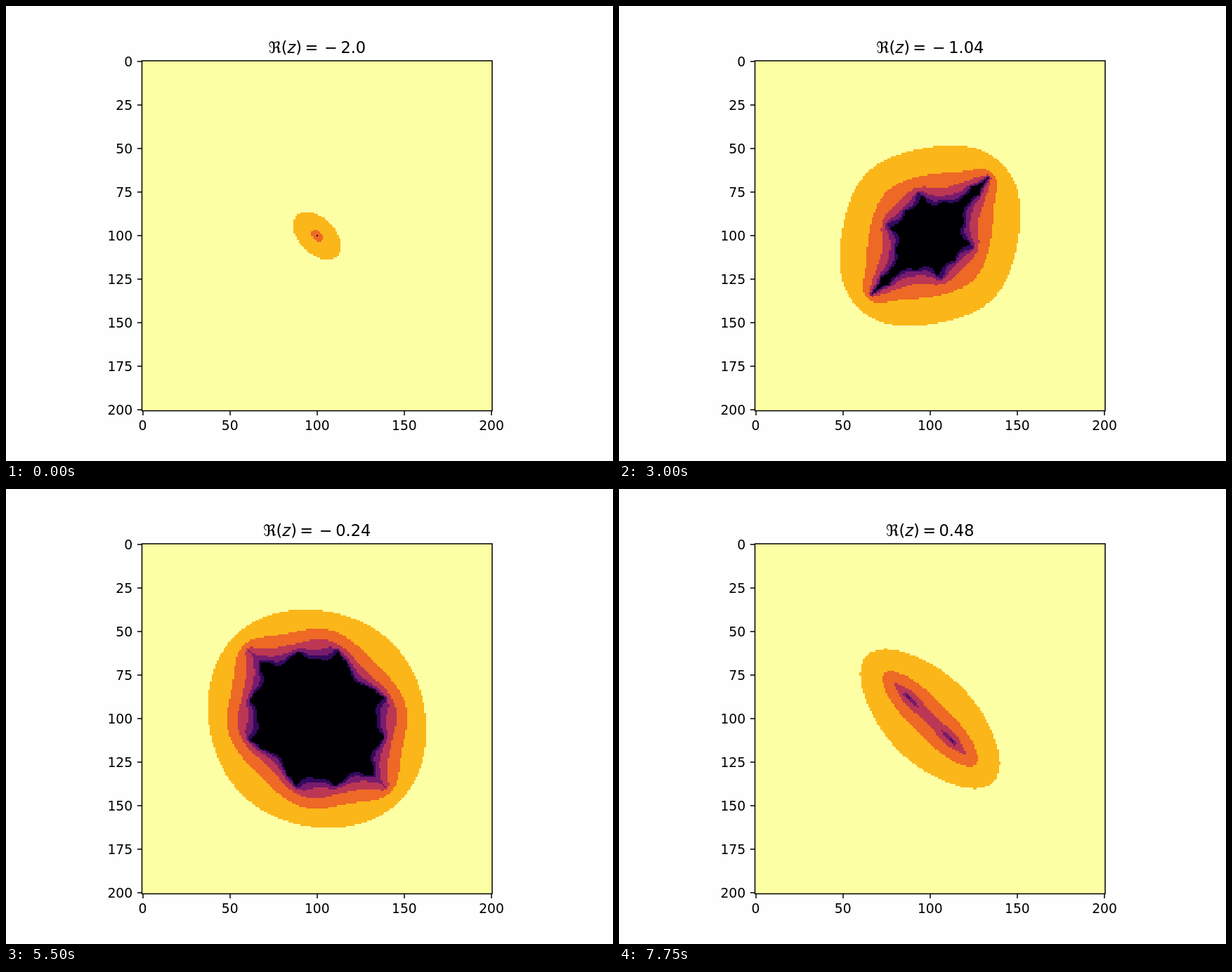
An HTML page with a canvas that plays this animation: 864x648 px, repeating every 8 s.

```html
<!DOCTYPE html>
<html lang="en">
<head>
<meta charset="utf-8">
<title>Slices of a four-dimensional set</title>
<style>
  html, body { margin: 0; width: 100%; height: 100%; overflow: hidden; background: #fefefe; }
  canvas, svg { position: absolute; left: 0; top: 0; }
  text { font-family: "DejaVu Sans", sans-serif; font-size: 18.75px; fill: #000; }
  #title { font-size: 22.5px; text-anchor: middle; }
  #axes { fill: none; stroke: #000; stroke-width: 1.5; }
</style>
</head>
<body>
<canvas id="stage" width="864" height="648"></canvas>
<svg width="864" height="648" viewBox="0 0 864 648">
  <path id="axes"/>
  <g id="labels"></g>
  <text id="title" x="442.8" y="66.5">ℜ(<tspan font-style="italic">z</tspan>)<tspan dx="4.4">=</tspan><tspan id="sign" dx="8.8">−</tspan><tspan id="value" dx="4.4"></tspan></text>
</svg>
<script>
const $ = id => document.getElementById(id);

const N = 201, LEFT = 193.32, TOP = 77.76, SIZE = 498.96, CELL = SIZE / N;
const STEP_MS = 250, STEPS = 32;
const MAX_NORM = 12, FIRST = 3, LAST = 9;
const COLORS = ['fcffa4', 'fbb61a', 'ed6925', 'bc3754', '781c6d', '320a5e', '000004']
  .map(hex => [0, 2, 4].map(i => parseInt(hex.slice(i, i + 2), 16)));

const ctx = $('stage').getContext('2d');
ctx.imageSmoothingEnabled = false;
const grid = document.createElement('canvas');
grid.width = grid.height = N;
const gridCtx = grid.getContext('2d');
const image = gridCtx.createImageData(N, N);

// The 4D number splits into two complex parts mirrored about re.
function level(re, u, v) {
  const p = re + u, q = re - u;
  let a = p, b = v, c = q, d = v;
  for (let n = 2; n < LAST; n++) {
    [a, b] = [a * a - b * b + p, 2 * a * b + v];
    [c, d] = [c * c - d * d + q, 2 * c * d + v];
    if ((a * a + b * b + c * c + d * d) / 2 > MAX_NORM) return Math.max(0, n - FIRST);
  }
  return LAST - FIRST;
}

function drawSlice(re) {
  const unit = 0.02 * Math.SQRT1_2, mid = (N - 1) / 2;
  for (let row = 0, k = 0; row < N; row++) {
    for (let col = 0; col < N; col++, k += 4) {
      const rgb = COLORS[level(re, (col - row) * unit, (col + row - 2 * mid) * unit)];
      image.data.set(rgb, k);
      image.data[k + 3] = 255;
    }
  }
  gridCtx.putImageData(image, 0, 0);
  ctx.clearRect(0, 0, 864, 648);
  ctx.drawImage(grid, LEFT, TOP, SIZE, SIZE);
}

function setTitle(re) {
  const size = Math.abs(re);
  $('sign').textContent = re < 0 ? '−' : '';
  $('value').textContent = Number.isInteger(size) ? size.toFixed(1) : String(size);
}

function addLabel(text, x, y, anchor) {
  const el = document.createElementNS('http://www.w3.org/2000/svg', 'text');
  el.setAttribute('x', x);
  el.setAttribute('y', y);
  el.setAttribute('text-anchor', anchor);
  el.textContent = text;
  $('labels').append(el);
}

function drawAxes() {
  const x0 = 193.5, x1 = 692, y0 = 78, y1 = 576.5;
  let path = `M${x0} ${y0}H${x1}V${y1}H${x0}Z`;
  for (let n = 0; n <= 200; n += 25) {
    const offset = (n + 0.5) * CELL;
    path += `M${x0} ${Math.round(TOP + offset)}h-6.6`;
    addLabel(n, 180.2, TOP + offset + 6.8, 'end');
    if (n % 50 === 0) {
      path += `M${Math.round(LEFT + offset)} ${y1}v6.6`;
      addLabel(n, LEFT + offset, 603.5, 'middle');
    }
  }
  $('axes').setAttribute('d', path);
}

let shown = -1;
function tick() {
  const step = Math.floor(performance.now() / STEP_MS) % STEPS;
  if (step !== shown) {
    shown = step;
    const re = -2 + step * 0.08;
    drawSlice(re);
    setTitle(re);
  }
  requestAnimationFrame(tick);
}

drawAxes();
tick();
</script>
</body>
</html>
```
